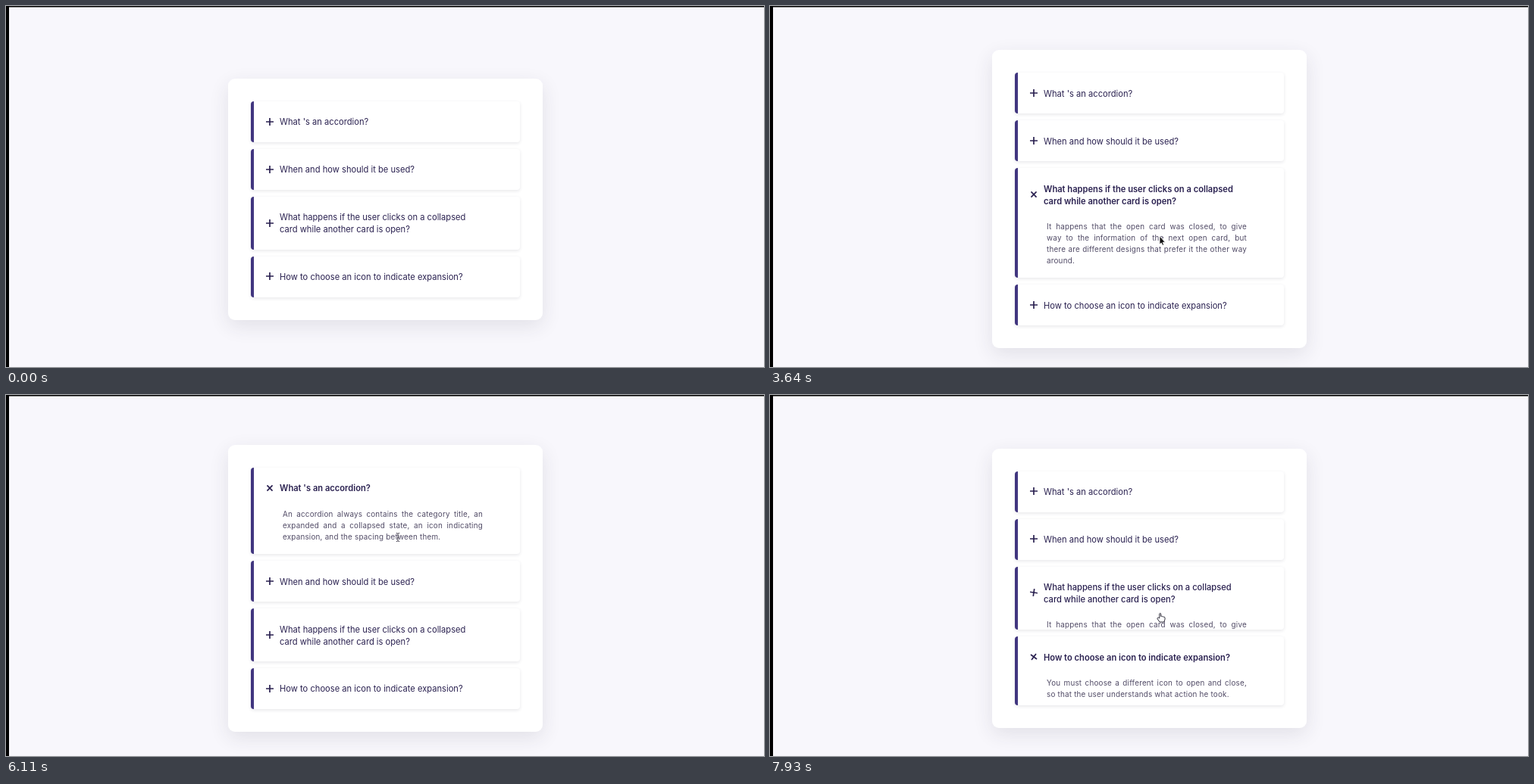
These frames come from a looping animation (1000 by 477 pixels, 8000 ms). An HTML page:

```html
<!DOCTYPE html>
<html lang="en">
<head>
<meta charset="utf-8">
<title>Accordion</title>
<style>
  html, body { margin: 0; width: 100%; height: 100%; overflow: hidden; background: #f8f7fc; }
  #stage { position: absolute; left: 0; top: 0; width: 1000px; height: 477px; overflow: hidden;
    font-family: Inter, "Open Sans", sans-serif; background: #f8f7fc; }
  #edge { position: absolute; inset: 0; border: solid #000; border-width: 1px 0 0 4px;
    box-shadow: inset 0 1px #777; }
  #centre { position: absolute; left: 293px; top: 0; height: 510.5px; display: flex; align-items: center; }
  #card { box-sizing: border-box; width: 414.5px; padding: 30px 29.5px 30px 30px; border-radius: 9px;
    background: #fff; box-shadow: 0 8px 26px rgba(50, 44, 66, .11); }
  .item { position: relative; box-sizing: border-box; overflow: hidden; border-left: 4px solid #41367f;
    border-radius: 4px; background: #fff; box-shadow: 0 1.5px 4px rgba(40, 35, 60, .11); }
  .item + .item { margin-top: 9px; }
  .icon { position: absolute; left: 16px; width: 10px; height: 10px; }
  .icon path { stroke: #2a2150; stroke-width: 1.7; }
  .title { position: absolute; left: 34px; top: 19.4px; font-size: 11.17px; line-height: 16px;
    white-space: pre; color: #2a2150; }
  .title span { display: inline-block; height: 16px; }
  .selected span { background: #423b58; color: #cdc5dd; }
  .body { position: absolute; left: 38px; width: 264px; font-size: 9.9px; line-height: 15.1px;
    letter-spacing: .2px; color: #514b66; white-space: nowrap; }
  .justified { display: flex; justify-content: space-between; }
  #cursor { position: absolute; left: 0; top: 0; width: 16px; height: 16px; overflow: visible; }
</style>
</head>
<body>
<div id="stage">
  <div id="edge"></div>
  <div id="centre"><div id="card"></div></div>
  <svg id="cursor" viewBox="-8 -8 16 16" stroke-linejoin="round">
    <path id="arrow" d="M-3-6V5L-.7 3 .8 6.3 2.6 5.4 1.2 2.3H4.4Z" fill="#111" stroke="#fff" stroke-width=".8"/>
    <path id="hand" d="M-2.2 1V-5Q-1.2-6.5-.3-5V-1.5Q.8-2.3 1.5-1.2 2.5-1.8 3.2-.7 4.8-1.2 5 .3V2.5L3.7 6H-1.9L-5 1.6Q-5-.2-3.5.2Z" fill="#fff" stroke="#2a2836"/>
    <path id="beam" d="M-2.2-5.5Q0-5.5 0-4.5 0-5.5 2.2-5.5M0-4.5V4.5M-2.2 5.5Q0 5.5 0 4.5 0 5.5 2.2 5.5M-1 .8H1" fill="none" stroke="#45424f"/>
  </svg>
</div>
<script>
const LOOP = 8000, STEP = 130, OPENING = 450, LINE = 15.1;

// "open" holds [start, end] times of each expanded period.
const items = [
  { title: "What 's an accordion?", closed: 54, open: [[5480, 6960]],
    body: ["An accordion always contains the category title, an",
           "expanded and a collapsed state, an icon indicating",
           "expansion, and the spacing between them."] },
  { title: "When and how should it be used?", closed: 54, open: [[1880, 2780]],
    body: ["It should be used when users only need a few key",
           "concepts or descriptions of the content on a single",
           "page."] },
  { title: "What happens if the user clicks on a collapsed\ncard while another card is open?",
    closed: 69.5, open: [[2780, 4370], [7862, Infinity]],
    body: ["It happens that the open card was closed, to give",
           "way to the information of the next open card, but",
           "there are different designs that prefer it the other way",
           "around."] },
  { title: "<span>How to choose an ico</span>n to indicate expansion?", closed: 54, open: [[6960, 7862]],
    body: ["You must choose a different icon to open and close,",
           "so that the user understands what action he took."] }
];

// Pointer path: time, x, y, shape.
const pointer = [
  [130, 592, 466, "arrow"], [260, 601, 425, "arrow"], [390, 607, 389, "arrow"],
  [650, 607, 389, "arrow"], [780, 605, 387, "arrow"], [1170, 605, 387, "hand"],
  [1690, 530, 218, "hand"], [2340, 530, 218, "hand"], [2600, 538, 316, "hand"],
  [3510, 538, 316, "hand"], [3640, 517, 310, "arrow"], [3770, 517, 300, "hand"],
  [4160, 517, 252, "hand"], [4810, 517, 252, "hand"], [5330, 519, 192, "hand"],
  [5590, 517, 155, "hand"], [5850, 517, 155, "hand"], [6110, 517, 188, "beam"],
  [6240, 516, 210, "hand"], [6890, 492, 387, "hand"], [7280, 492, 387, "hand"],
  [7800, 516, 294, "hand"], [LOOP, 516, 294, "hand"]
];

const $ = id => document.getElementById(id);

function bodyLine(text, i, lines) {
  return i < lines.length - 1
    ? `<div class="justified">${text.split(" ").map(w => `<span>${w}</span>`).join(" ")}</div>`
    : `<div>${text}</div>`;
}

for (const item of items) {
  const el = item.el = document.createElement("div");
  el.className = "item";
  el.innerHTML = `
    <svg class="icon" style="top:${item.closed / 2 - 5.1}px" viewBox="-5 -5 10 10"><path d="M-5 0H5M0-5V5"/></svg>
    <div class="title">${item.title}</div>
    <div class="body" style="top:${item.closed}px">${item.body.map(bodyLine).join("")}</div>`;
  item.icon = el.querySelector("path");
  item.heading = el.querySelector(".title");
  $("card").append(el);
}

// CSS "ease" timing: cubic-bezier(.25, .1, .25, 1)
function ease(x) {
  if (x <= 0) return 0;
  if (x >= 1) return 1;
  const bezier = (a, b, s) => 3 * (1 - s) ** 2 * s * a + 3 * (1 - s) * s * s * b + s ** 3;
  let low = 0, high = 1;
  for (let i = 0; i < 20; i++) {
    const mid = (low + high) / 2;
    if (bezier(.25, .25, mid) < x) low = mid; else high = mid;
  }
  return bezier(.1, 1, low);
}

function drawItem(item, t) {
  const p = item.open.reduce((sum, [start, end]) =>
    sum + ease((t - start) / OPENING) - ease((t - end) / OPENING), 0);
  item.el.style.height = item.closed + p * (item.body.length * LINE + 15) + "px";
  item.icon.setAttribute("transform", `rotate(${45 * p})`);
  item.heading.style.fontWeight = p > .5 ? 600 : p > .001 ? 500 : 400;
}

function drawPointer(t) {
  const visible = t >= pointer[0][0];
  $("cursor").style.display = visible ? "" : "none";
  if (!visible) return;
  const next = pointer.findIndex(key => key[0] > t);
  const [t0, x0, y0, shape] = pointer[next - 1], [t1, x1, y1] = pointer[next];
  const k = (t - t0) / (t1 - t0);
  $("cursor").style.transform = `translate(${x0 + (x1 - x0) * k - 8}px, ${y0 + (y1 - y0) * k - 8}px)`;
  for (const id of ["arrow", "hand", "beam"]) $(id).style.display = id === shape ? "" : "none";
}

function draw(now) {
  const t = Math.floor(now % LOOP / STEP) * STEP;
  items.forEach(item => drawItem(item, t));
  items[3].heading.classList.toggle("selected", t >= 6880 && t < 7780);
  drawPointer(t);
}

const begin = performance.now();
function tick() {
  draw(performance.now() - begin);
  requestAnimationFrame(tick);
}
tick();
</script>
</body>
</html>
```
